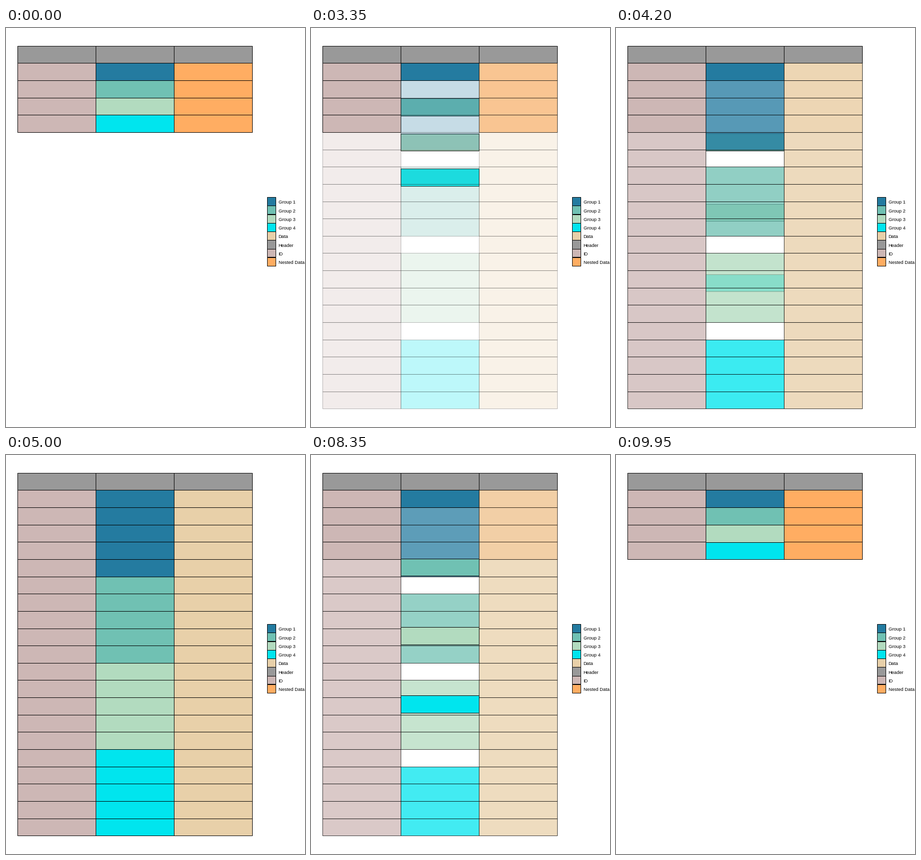
Animation of 600x800 px, one loop 10000 ms. Source, as a matplotlib script:

```python
import numpy as np
import matplotlib.pyplot as plt
from matplotlib.animation import FuncAnimation
from matplotlib.patches import Rectangle

W, H, DPI = 600, 800, 100
FRAMES, STEP = 200, 50
REST = MOVE = 50                        # frames per pause and per transition
LEFT, COL = 23, 157                     # table columns, px
TOP, ROW = 35.8, 34.64                  # table rows, px
LINE = 72 / DPI                         # one pixel in points

GROUPS = ["#247BA0", "#70C1B3", "#B2DBBF", "#00E5EE"]
DATA, HEADER, ID, NESTED = "#E8D0A9", "#999999", "#CDB7B5", "#FFAD62"
SIZE = 5                                # rows per group

fig = plt.figure(figsize=(W / DPI, H / DPI), dpi=DPI, facecolor="white")
ax = fig.add_axes([0, 0, 1, 1])
ax.set(xlim=(0, W), ylim=(H, 0))
ax.axis("off")


def box(x0, y0, x1, y1, color, z=2):
    patch = Rectangle((x0, y0), x1 - x0, y1 - y0, facecolor=color,
                      edgecolor="black", linewidth=LINE, zorder=z, snap=True)
    return ax.add_patch(patch)


def place(patch, row):
    y0, y1 = np.round(TOP + ROW * np.array([row, row + 1]))
    patch.set_y(y0)
    patch.set_height(y1 - y0)


def cell(col, row, color):
    x = LEFT + COL * col
    patch = box(x, 0, x + COL, 1, color)
    place(patch, row)
    return patch


def fade(patches, alpha, z):
    for p in patches:
        p.set_alpha(alpha)
        p.set_zorder(z)


def draw_legend():
    names = [f"Group {i}" for i in range(1, 5)] + ["Data", "Header", "ID", "Nested Data"]
    colors = GROUPS + [DATA, HEADER, ID, NESTED]
    pitch = 17.28
    for i, (name, color) in enumerate(zip(names, colors)):
        y0, y1 = round(339 + pitch * i), round(338.9 + pitch * (i + 1))
        if name == "ID":
            y1 -= 1
        box(524, y0, 541, y1, color)
        ax.text(546.6, round(352.3 + pitch * i), name, family="Liberation Sans",
                size=9.4 * LINE, color="black", va="baseline")


# Cells that stay in place
for c in range(3):
    cell(c, 0, HEADER)
for r in range(1, 5):
    cell(0, r, ID)

# Group cells travel from the nested table to the head of their block
heads = [(cell(1, g + 1, color), g + 1, SIZE * g + 1)
         for g, color in enumerate(GROUPS)]

# Cells that exist only in the nested or only in the long table
nested = [cell(2, r, NESTED) for r in range(1, 5)]
full = []
for r in range(1, 4 * SIZE + 1):
    g, k = divmod(r - 1, SIZE)
    if r > 4:
        full.append(cell(0, r, ID))
    if k:
        full.append(cell(1, r, GROUPS[g]))
    full.append(cell(2, r, DATA))

draw_legend()


def ease(p):
    return (1 - np.cos(np.pi * p)) / 2


def update(i):
    half, k = divmod(i, REST + MOVE)
    e = ease(max(0, k - REST) / MOVE)
    unnesting = half == 0
    t = e if unnesting else 1 - e
    # Leaving cells lie below the moving ones, arriving cells above
    fade(nested, 1 - t, 1 if unnesting else 3)
    fade(full, t, 3 if unnesting else 1)
    for patch, start, end in heads:
        place(patch, start + (end - start) * t)
    return []


anim = FuncAnimation(fig, update, frames=FRAMES, interval=STEP,
                     init_func=lambda: [], repeat=True, repeat_delay=0, blit=False)
plt.show()
```
